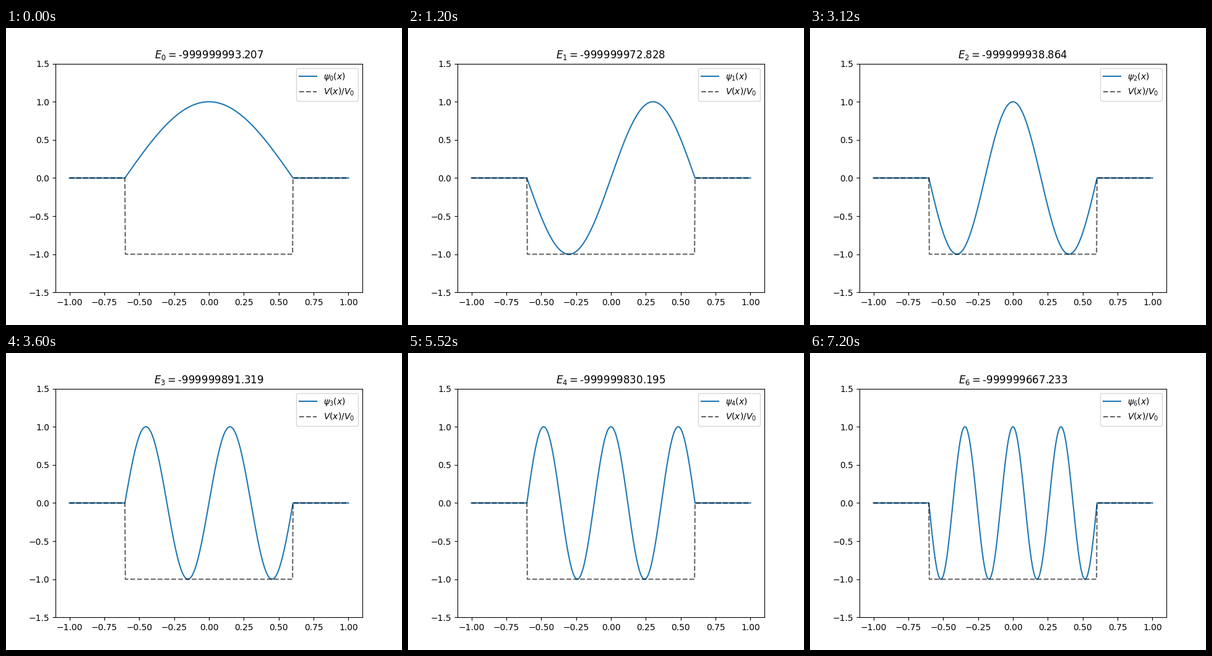
Recreate the animation shown at these times as a matplotlib script. Size 640 by 480 pixels, loop 8 s.

```python
import numpy as np
import matplotlib.pyplot as plt
from matplotlib.animation import FuncAnimation

POINTS = 600
HOLD = 3            # ticks per eigenstate
TICK = 400          # ms
TICKS = 20
DEPTH = 1e9
# Energies above the bottom of the well
LEVELS = [6.793, 27.172, 61.136, 108.681, 169.805, 244.502, 332.767]

x = np.linspace(-1, 1, POINTS)
step = x[1] - x[0]
inside = np.abs(x) < 0.6
# The wave vanishes on the first grid point outside the well
width = (inside.sum() + 1) * step


def wave(n):
    phase = (n + 1) * np.pi * x / width
    shape = np.sin(phase) if n % 2 else np.cos(phase)
    psi = np.where(inside, shape, 0)
    return psi / np.abs(psi).max()


plt.rcParams["font.family"] = "DejaVu Sans"
fig, ax = plt.subplots(figsize=(6.4, 4.8), dpi=100)
psi_line, = ax.plot(x, wave(0), label=r"$\psi_0(x)$")
ax.plot(x, np.where(inside, -1, 0), "k--", alpha=0.6, label="$V(x)/V_0$")
ax.set_ylim(-1.5, 1.5)
legend = ax.legend(loc="upper right")
title = ax.set_title("")


def update(tick):
    n = tick // HOLD
    psi_line.set_ydata(wave(n))
    legend.get_texts()[0].set_text(rf"$\psi_{n}(x)$")
    title.set_text(f"$E_{n} = ${LEVELS[n] - DEPTH:.3f}")
    return psi_line, legend, title


anim = FuncAnimation(fig, update, frames=TICKS, interval=TICK,
                     repeat=True, repeat_delay=0, blit=False)
plt.show()
```
